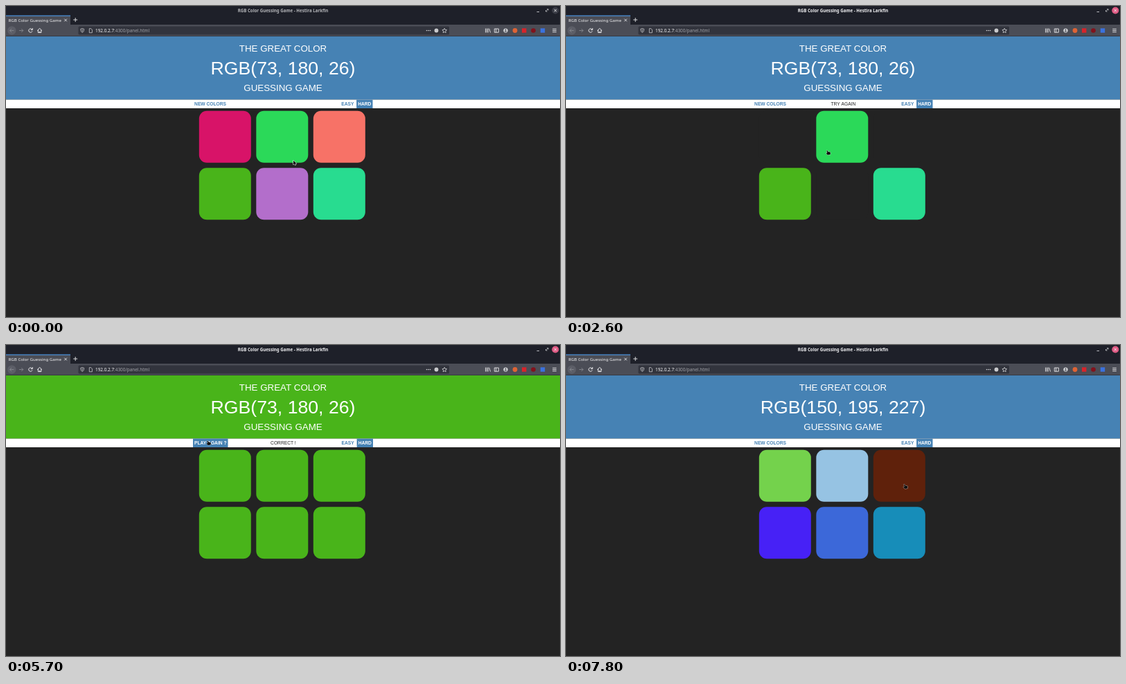
An HTML page with a canvas for the animation above (8 s loop, 800 px wide and 450 px high).

```html
<!DOCTYPE html>
<html lang="en">
<head>
<meta charset="utf-8">
<title>Color guessing game</title>
<style>
  html, body { margin: 0; width: 100%; height: 100%; overflow: hidden; background: #232323; }
  canvas { display: block; width: 800px; height: 450px; }
</style>
</head>
<body>
<canvas id="stage" width="800" height="450"></canvas>
<script>
const ctx = document.getElementById('stage').getContext('2d');
const LOOP = 8000, STEP = 100, FADE = 300;
const WIN = 3840, RESET = 5960, HOVER_ON = 5380, HOVER_OFF = 6490;

const SANS = '"Liberation Sans", Arial, sans-serif';
const UI = '"Noto Sans", sans-serif';
const BODY = [35, 35, 35], BLUE = [70, 130, 180], WHITE = [255, 255, 255], GREEN = [73, 180, 26];
const FIRST = [[216, 19, 104], [43, 217, 89], [247, 114, 103], GREEN, [179, 110, 203], [40, 220, 144]];
const SECOND = [[116, 210, 76], [150, 195, 227], [95, 33, 11], [71, 33, 246], [60, 104, 217], [23, 141, 185]];
const PICKED = [2120, 3000, 550, Infinity, 1500, Infinity];

// Pointer path: time, x, y
const PATH = [
  [100, 414.5, 223], [400, 445, 203], [900, 445, 203], [1300, 402, 252], [1600, 402, 252],
  [2000, 318, 196], [2400, 318, 196], [2800, 432, 221], [3000, 428, 180], [3300, 428, 180],
  [3600, 320, 256], [4500, 320, 256], [4900, 432, 160], [5100, 432, 160], [5600, 289, 138],
  [6350, 289, 138], [6500, 256, 159.5], [6600, 330, 285], [6700, 415, 304], [6800, 418, 251],
  [6900, 377, 303], [7200, 377, 303], [7450, 306, 260], [7800, 486.5, 201]
];

const rgb = c => `rgb(${c.map(Math.round).join(',')})`;
const mix = (a, b, k) => a.map((v, i) => v + (b[i] - v) * k);
const clamp = v => Math.min(1, Math.max(0, v));

// CSS "ease": cubic-bezier(.25, .1, .25, 1)
function ease(p) {
  if (p <= 0 || p >= 1) return clamp(p);
  const curve = (a, b, u) => 3 * a * u * (1 - u) ** 2 + 3 * b * u * u * (1 - u) + u ** 3;
  let lo = 0, hi = 1;
  for (let i = 0; i < 20; i++) {
    const mid = (lo + hi) / 2;
    if (curve(.25, .25, mid) < p) lo = mid; else hi = mid;
  }
  return curve(.1, 1, lo);
}
const fade = (t, start) => ease((t - start) / FADE);

function rect(x, y, w, h, color, r = 0) {
  ctx.fillStyle = color;
  ctx.beginPath();
  ctx.roundRect(x, y, w, h, r);
  ctx.fill();
}

function disc(x, y, r, color) {
  ctx.fillStyle = color;
  ctx.beginPath();
  ctx.arc(x, y, r, 0, Math.PI * 2);
  ctx.fill();
}

function line(path, color = '#e8e8ea', width = 0.9) {
  ctx.strokeStyle = color;
  ctx.lineWidth = width;
  ctx.stroke(new Path2D(path));
}

function text(str, x, y, font, color, align = 'left') {
  ctx.font = font;
  ctx.fillStyle = color;
  ctx.textAlign = align;
  ctx.fillText(str, x, y);
}

function drawWindowBar(focused) {
  rect(0, 0, 800, 27, '#1e2029');
  text('RGB Color Guessing Game - Hestira Larkfin', 400, 8.8, `bold 6.15px ${UI}`,
    focused ? '#f2f2f4' : '#b5b6ba', 'center');
  line('M766.5 8.5h3.5', '#d0d1d5');
  line('M779.5 8l3.5 -3.5M781 4.5h2v2M779.5 6v2h2', '#d0d1d5', 0.7);
  disc(793.3, 6.5, 5, focused ? '#df5c85' : '#3a3c46');
  line('M791.6 4.8l3.4 3.4M795 4.8l-3.4 3.4', '#f4f4f4', 0.9);

  rect(0, 14, 93, 13, '#4b4d56');
  rect(0, 13.5, 93, 1.2, '#4a90d9');
  text('RGB Color Guessing Game', 3.5, 22.7, `6.15px ${UI}`, '#f4f4f5');
  line('M84.3 18.7l3.6 3.6M87.9 18.7l-3.6 3.6');
  line('M97.2 20h6M100.2 17v6');
}

function drawToolbar() {
  rect(0, 27, 800, 17, '#4b4d56');
  rect(0, 43.2, 800, 0.8, '#31333b');

  disc(8.3, 35.5, 6.2, '#5c5e67');
  line('M11.3 35.5h-5.8M8 33l-2.5 2.5l2.5 2.5', '#85878e');
  line('M19 35.5h5.8M22.3 33l2.5 2.5l-2.5 2.5', '#85878e');
  line('M37.6 33.8a2.7 2.7 0 1 0 .4 2.6M38.3 32v2.5h-2.5', '#ececee', 1);
  line('M45.2 35.6l3.4 -3.2l3.4 3.2M46.4 35v3.5h4.4v-3.5M48.6 38.5v-2', '#ececee', 1);

  rect(104.5, 29.5, 535.5, 12, '#32343d', 1.5);
  line('M110.2 32.5l2.5 .8q0 4 -2.5 5.2q-2.5 -1.2 -2.5 -5.2zM110.2 33.5v4', '#c9cacd', 0.8);
  line('M120.3 32.7h2.5l1.6 1.6v4.4h-4.1z', '#c9cacd', 0.8);
  const font = `6.4px ${UI}`;
  text('192.0.2.7', 129, 37.8, font, '#f5f5f6');
  const hostWidth = ctx.measureText('192.0.2.7').width;
  text(':4300/panel.html', 129 + hostWidth, 37.8, font, '#a2a3a9');

  for (let i = 0; i < 3; i++) disc(607.5 + i * 2.5, 35.5, 0.8, '#dcdde0');
  disc(621.5, 35.5, 2.9, '#c9cacd');
  line('M633.2 32.3l1 2.1l2.3 .3l-1.7 1.6l.4 2.3l-2 -1.1l-2 1.1l.4 -2.3l-1.7 -1.6l2.3 -.3z', '#dcdde0', 0.8);

  line('M692.5 32.5v6M694.4 32.5v6M696.2 32.5v6M697.7 32.7l1.8 5.8');
  line('M705.3 33h6v5.2h-6zM707.7 33v5.2');
  disc(721.5, 35.5, 3.1, '#dcdde0');
  disc(721.5, 34.6, 1.1, '#4b4d56');
  rect(719.8, 36.3, 3.4, 1.2, '#4b4d56', 0.6);
  disc(735, 35.5, 3.4, '#df6335');
  rect(745, 32.3, 6.4, 6.4, '#d8232a');
  disc(761.5, 35.5, 3.3, '#82121c');
  rect(771.8, 32.3, 6.4, 6.4, '#3b72de');
  line('M789.2 33.3h5.6M789.2 35.5h5.6M789.2 37.7h5.6');
}

function drawHeader(t) {
  const color = mix(BLUE, GREEN, fade(t, WIN) - fade(t, RESET));
  rect(0, 44, 800, 91.6, rgb(color));
  const small = `13.33px ${SANS}`;
  text('THE GREAT COLOR', 400, 66.3, small, '#fff', 'center');
  text(t < RESET ? 'RGB(73, 180, 26)' : 'RGB(150, 195, 227)', 400, 99.4, `26.67px ${SANS}`, '#fff', 'center');
  text('GUESSING GAME', 400, 122.7, small, '#fff', 'center');
}

function drawMenu(t) {
  const won = t >= WIN && t < RESET;
  const bold = `bold 6.67px ${SANS}`;
  const base = 144.1, shift = won ? 0.5 : 0;
  rect(0, 135.6, 800, 12.4, '#fff');

  const hover = fade(t, HOVER_ON) - fade(t, HOVER_OFF);
  if (hover > 0) rect(270, 135.6, 50.5, 12.4, rgb(mix(WHITE, BLUE, hover)));
  text(won ? 'PLAY AGAIN ?' : 'NEW COLORS', 272.1, base, bold, rgb(mix(BLUE, WHITE, hover)));

  const message = won ? 'CORRECT !' : t >= PICKED[2] && t < WIN ? 'TRY AGAIN' : '';
  text(message, 400.4, base, `6.67px ${SANS}`, '#232323', 'center');

  text('EASY', 484.3 + shift / 2, base, bold, rgb(BLUE));
  rect(506.1 + shift, 135.6, 23.4, 12.4, rgb(BLUE));
  text('HARD', 508.2 + shift, base, bold, '#fff');
}

const cellX = i => 278.8 + (i % 3) * 82.5;
const cellY = i => 151.8 + Math.floor(i / 3) * 82.5;

function cellColor(i, t) {
  if (t >= RESET) return mix(GREEN, SECOND[i], fade(t, RESET));
  const shown = mix(FIRST[i], BODY, fade(t, PICKED[i]));
  return mix(shown, GREEN, fade(t, WIN));
}

function drawCells(t) {
  for (let i = 0; i < 6; i++) rect(cellX(i), cellY(i), 75, 75, rgb(cellColor(i, t)), 11.25);
}

function pointerAt(t) {
  const next = PATH.findIndex(p => p[0] >= t);
  if (next === 0) return PATH[0].slice(1);
  if (next < 0) return PATH[PATH.length - 1].slice(1);
  const [t0, ...from] = PATH[next - 1], [t1, ...to] = PATH[next];
  const p = (t - t0) / (t1 - t0);
  return mix(from, to, p * p * (3 - 2 * p));
}

function isClickable(x, y) {
  const inside = (l, top, w, h) => x >= l && x <= l + w && y >= top && y <= top + h;
  if (inside(270, 135, 50.5, 13)) return true;
  return FIRST.some((_, i) => inside(cellX(i), cellY(i), 75, 75));
}

const ARROW = new Path2D('M.5 .5v6.2l1.5 -1.3l1 2.1l1 -.5l-1 -2h2z');
const HAND = new Path2D('M1.4 .6q.8 -.5 1.3 .4l.9 1.6l2.3 .2q1 .2 .9 1.2l-.2 2.6l-3.9 .4l-2 -2.2q-.3 -.9 .7 -.8l.9 .4z');

function drawPointer(t) {
  const [x, y] = pointerAt(t);
  const hand = t >= 100 && isClickable(x, y);
  const shape = hand ? HAND : ARROW;
  ctx.save();
  ctx.translate(x, y);
  ctx.lineJoin = 'round';
  ctx.lineWidth = hand ? 0.8 : 1;
  ctx.strokeStyle = hand ? 'rgba(255,255,255,.75)' : '#fff';
  ctx.stroke(shape);
  ctx.fillStyle = '#111';
  ctx.fill(shape);
  ctx.restore();
}

function draw(now) {
  const t = Math.floor((now % LOOP) / STEP) * STEP;
  rect(0, 0, 800, 450, rgb(BODY));
  drawWindowBar(t >= 100);
  drawToolbar();
  drawHeader(t);
  drawMenu(t);
  drawCells(t);
  drawPointer(t);
}

const start = performance.now();
function tick() {
  draw(performance.now() - start);
  requestAnimationFrame(tick);
}
tick();
</script>
</body>
</html>
```
